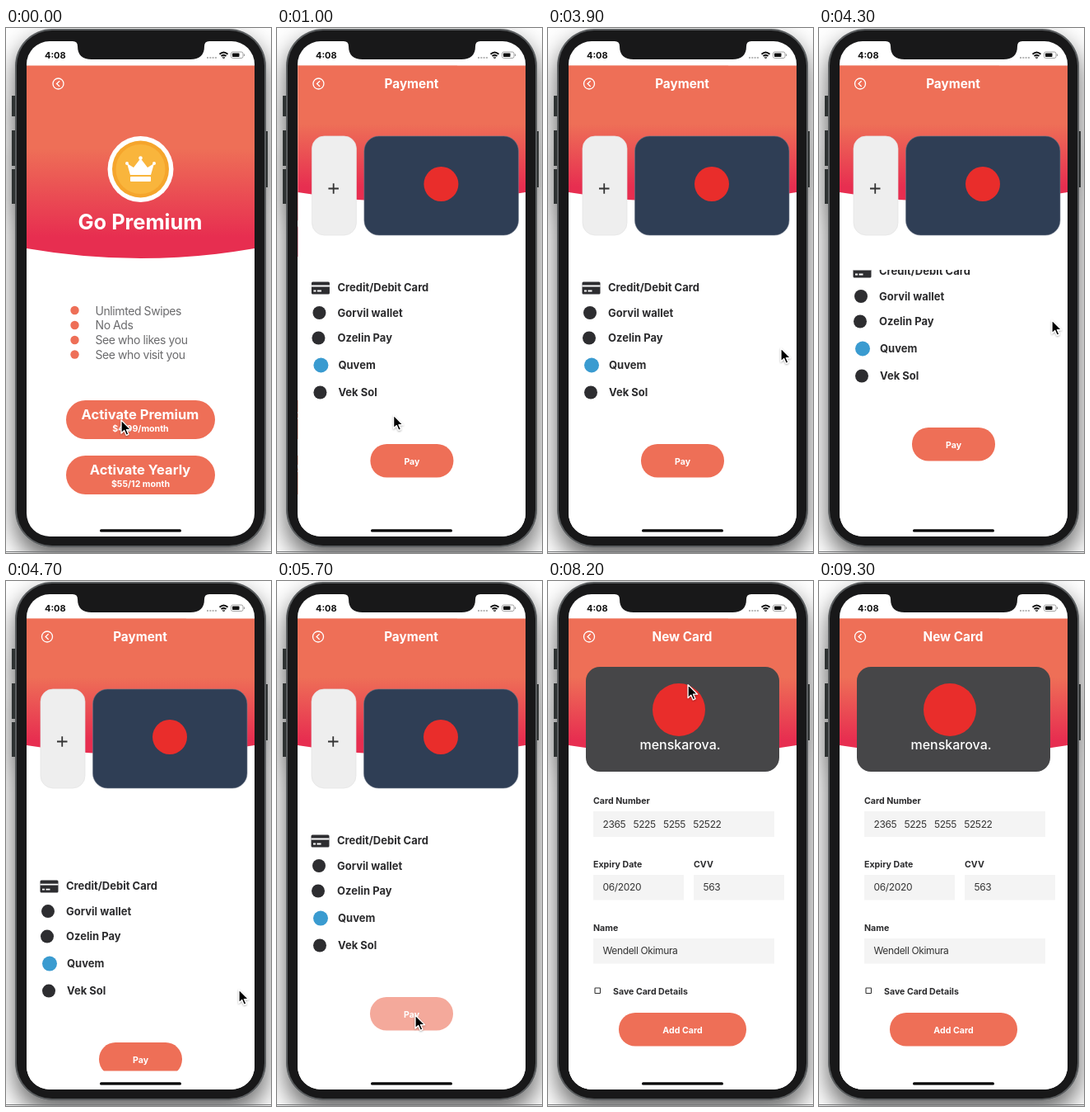
Recreate the animation shown at these times as an HTML page. Size 322x636 px, loop 9.4 s.

```html
<!DOCTYPE html>
<html lang="en">
<head>
<meta charset="utf-8">
<title>Premium checkout</title>
<style>
  html, body { margin: 0; width: 100%; height: 100%; overflow: hidden; background: #fff; }
  svg { display: block; width: 322px; height: 636px; }
  text { font-family: Inter, "Open Sans", sans-serif; fill: #2b2b2d; }
  .mid { text-anchor: middle; }
  .white, .white text { fill: #fff; font-weight: 700; }
  .title { font-size: 15.3px; }
  .h1 { font-size: 25.4px; }
  .big { font-size: 16.5px; }
  .small { font-size: 10.6px; }
  .perks text { font-size: 14px; letter-spacing: -.03em; fill: #6b6b6d; }
  .perks circle, .btn { fill: #ee6f57; }
  .methods text { font-size: 13px; font-weight: 700; }
  .label { font-size: 10.6px; font-weight: 700; }
  .field { fill: #f4f4f4; }
  .value { font-size: 12px; letter-spacing: -.03em; fill: #333; white-space: pre; }
  .dark { fill: #2d2d30; }
</style>
</head>
<body>
<svg viewBox="0 0 322 636">
  <defs>
    <linearGradient id="sunset" x2="0" y2="1">
      <stop offset=".43" stop-color="#ee6f57"/>
      <stop offset=".89" stop-color="#e72e50"/>
    </linearGradient>
    <filter id="shadow" x="-25%" width="150%" y="-12%" height="125%">
      <feDropShadow dx="0" dy="14" stdDeviation="15" flood-opacity=".62"/>
    </filter>
    <filter id="pointerShadow" x="-50%" width="200%" y="-50%" height="200%">
      <feDropShadow dx="0" dy="1" stdDeviation=".8" flood-opacity=".35"/>
    </filter>
    <clipPath id="screen"><rect x="25" y="16" width="277" height="600" rx="28"/></clipPath>
    <clipPath id="listView"><rect x="25" y="293" width="277" height="300.5"/></clipPath>
    <g id="back" fill="none" stroke="#fff" stroke-width="1.3" stroke-linecap="round">
      <circle r="6.5"/>
      <path d="M1.3-3L-1.9 0 1.3 3"/>
    </g>
    <g id="shortHeader">
      <rect x="25" y="45.5" width="277" height="571" fill="#fff"/>
      <path fill="url(#sunset)" d="M25 45.5H302V199Q163.5 222 25 199Z"/>
      <use href="#back" x="50" y="67.5"/>
    </g>
  </defs>

  <g filter="url(#shadow)">
    <path fill="#2f3132" d="M7 82h6v25h-6zM7 124h6v43h-6zM7 171h6v42h-6zM313 125h5v68h-5z"/>
    <rect x="11" y="1" width="305" height="628" rx="45" fill="#5a5d5f"/>
  </g>
  <rect x="13" y="3" width="301" height="624" rx="43" fill="#181819"/>
  <rect y="634" width="322" height="1" fill="#77797b"/>

  <g clip-path="url(#screen)">
    <rect x="25" y="16" width="277" height="600" fill="#fff"/>

    <g id="premium">
      <path fill="url(#sunset)" d="M25 45.5H302V267Q163.5 291 25 267Z"/>
      <use href="#back" x="63.5" y="67.5"/>
      <circle cx="163.5" cy="171" r="40" fill="#fff"/>
      <circle cx="163.5" cy="171" r="34.5" fill="#f5a52c"/>
      <circle cx="163.5" cy="171" r="30" fill="#f9b53c"/>
      <g fill="#fff">
        <path d="M147 164l8 5 8.5-11 8.5 11 8-5-4 14h-25z"/>
        <rect x="151" y="180" width="25" height="6" rx="1"/>
        <circle cx="147" cy="164" r="2"/>
        <circle cx="163.5" cy="157.5" r="2.3"/>
        <circle cx="180" cy="164" r="2"/>
      </g>
      <text class="mid white h1" x="163" y="243.5">Go Premium</text>
      <g class="perks">
        <circle cx="83.5" cy="342" r="5.2"/><text x="108.5" y="347.5">Unlimted Swipes</text>
        <circle cx="83.5" cy="360" r="5.2"/><text x="108.5" y="365.3">No Ads</text>
        <circle cx="83.5" cy="378" r="5.2"/><text x="108.5" y="383">See who likes you</text>
        <circle cx="83.5" cy="395.5" r="5.2"/><text x="108.5" y="400.8">See who visit you</text>
      </g>
      <g id="activate" class="mid white">
        <rect class="btn" x="73" y="451" width="181" height="47" rx="23.5"/>
        <text class="big" x="163" y="474">Activate Premium</text>
        <text class="small" x="163.5" y="489">$4.99/month</text>
      </g>
      <g class="mid white">
        <rect class="btn" x="73" y="518" width="181" height="47" rx="23.5"/>
        <text class="big" x="163" y="541">Activate Yearly</text>
        <text class="small" x="163.5" y="556">$55/12 month</text>
      </g>
    </g>

    <g id="payment">
      <use href="#shortHeader"/>
      <text class="mid white title" x="163" y="72.7">Payment</text>
      <g id="plus">
        <rect x="42" y="131" width="54" height="120" rx="15" fill="#eee" stroke="#e2e2e2" stroke-width=".7"/>
        <path d="M62 194.5h12.500M68.250 188.250v12.500" stroke="#333" stroke-width="1.8"/>
      </g>
      <rect x="105.5" y="131" width="187.5" height="120" rx="18" fill="#2f3e55" stroke="#6c7686" stroke-width=".6"/>
      <circle cx="199" cy="189" r="21" fill="#e92d2b"/>
      <g clip-path="url(#listView)">
        <g id="list">
          <g class="methods">
            <rect class="dark" x="41.5" y="307.5" width="22" height="15" rx="1.5"/>
            <path d="M41.500 312.500h22M44 318.500h3M48.500 318.500h5" stroke="#fff" stroke-width="1.8"/>
            <circle class="dark" cx="51" cy="345" r="8"/>
            <circle class="dark" cx="50" cy="375.5" r="8"/>
            <circle cx="53" cy="408.5" r="9" fill="#3a9bd0"/>
            <circle class="dark" cx="52" cy="441.5" r="8"/>
            <text x="73" y="319">Credit/Debit Card</text>
            <text x="73" y="349.5">Gorvil wallet</text>
            <text x="73" y="380">Ozelin Pay</text>
            <text x="74" y="413">Quvem</text>
            <text x="74" y="446">Vek Sol</text>
          </g>
          <g id="pay" class="mid white">
            <rect class="btn" x="113" y="504" width="101" height="40.5" rx="20"/>
            <text class="small" x="163.5" y="529">Pay</text>
          </g>
        </g>
      </g>
    </g>

    <g id="newCard">
      <use href="#shortHeader"/>
      <text class="mid white title" x="163" y="72.7">New Card</text>
      <rect x="46" y="104" width="235" height="127" rx="17" fill="#464648"/>
      <circle cx="159" cy="156" r="32" fill="#e92d2b"/>
      <text x="160.5" y="204" class="mid" style="font-size:16px;font-weight:500;fill:#fff">menskarova.</text>
      <text class="label" x="55" y="270">Card Number</text>
      <rect class="field" x="55" y="279" width="220" height="31"/>
      <text class="value" x="66.5" y="298.5">2365   5225   5255   52522</text>
      <text class="label" x="55" y="347">Expiry Date</text>
      <rect class="field" x="55" y="356" width="110" height="30.5"/>
      <text class="value" x="66.5" y="375">06/2020</text>
      <text class="label" x="177" y="347">CVV</text>
      <rect class="field" x="177" y="356" width="110" height="30.5"/>
      <text class="value" x="188.5" y="375">563</text>
      <text class="label" x="55" y="424">Name</text>
      <rect class="field" x="55" y="433" width="220" height="30.5"/>
      <text class="value" x="66.5" y="452">Wendell Okimura</text>
      <rect x="57" y="493" width="6.5" height="6.5" rx=".8" fill="none" stroke="#333" stroke-width="1.1"/>
      <text class="label" x="79" y="500.5">Save Card Details</text>
      <rect class="btn" x="86" y="523" width="155" height="40.5" rx="20"/>
      <text class="mid white small" x="163.5" y="548">Add Card</text>
    </g>

    <path fill="#181819" d="M81 15v1q6 0 6 6q0 16 17 16h120q17 0 17-16q0-6 6-6v-1z"/>
    <text x="47" y="37" style="font-size:11px;font-weight:700;fill:#111">4:08</text>
    <path d="M244 36h12" stroke="#b5b5b5" stroke-width="1.8" stroke-dasharray="2 1.3"/>
    <g fill="none" stroke="#111" stroke-width="1.9">
      <path d="M259.500 31.800q5-4.600 10 0M261.500 34q3-2.600 6 0"/>
      <circle cx="264.5" cy="35.8" r=".4"/>
    </g>
    <rect x="273.5" y="29" width="14.5" height="7.5" rx="2" fill="none" stroke="#999" stroke-width=".9"/>
    <rect x="275" y="30.5" width="8.5" height="4.5" rx=".8" fill="#111"/>
    <path d="M289.500 31.500v2.500" stroke="#999"/>
    <rect x="114" y="607.3" width="99" height="3.2" rx="1.6" fill="#000"/>
  </g>

  <path id="cursor" d="M0 0V16l3.700-3.500 2.500 5.800 2.700-1.200-2.500-5.500h5.100z"
        stroke="#fff" stroke-width="1.3" stroke-linejoin="round" filter="url(#pointerShadow)"/>
</svg>

<script>
const LOOP = 9400, WIDTH = 277;
const DRAG = { start: 4000, end: 4850, y: 388 };
const pointerPath = [ // time, x, y
  [0, 140, 475], [900, 140, 475], [1900, 197.5, 268], [2900, 197.5, 268],
  [3700, 283, 388], [4000, 283, 388], [4300, 283, 354], [4700, 283, 495],
  [4950, 283, 495], [5550, 168, 526], [6200, 168, 526], [7000, 164, 258],
  [7400, 68, 200], [7900, 68, 200], [8600, 326, 12]
];

const el = id => document.getElementById(id);
const clamp = v => Math.min(1, Math.max(0, v));
const smooth = v => (v = clamp(v), v * v * (3 - 2 * v));
const slide = (t, start) => 1 - (1 - clamp((t - start) / 500)) ** 4;
const press = (t, down, up) =>
  1 - .8 * smooth((t - down) / 150) * (1 - smooth((t - up) / 250));
const move = (id, x, y = 0) => el(id).setAttribute('transform', `translate(${x} ${y})`);
const fade = (id, opacity) => el(id).setAttribute('opacity', opacity);

function pointer(t) {
  const next = pointerPath.findIndex(p => p[0] > t);
  if (next < 0) return pointerPath.at(-1).slice(1);
  const [t0, x0, y0] = pointerPath[next - 1], [t1, x1, y1] = pointerPath[next];
  const k = smooth((t - t0) / (t1 - t0));
  return [x0 + (x1 - x0) * k, y0 + (y1 - y0) * k];
}

// The list follows the drag with resistance, then settles back.
function listOffset(t) {
  if (t < DRAG.start) return 0;
  const pull = .63 * (pointer(Math.min(t, DRAG.end))[1] - DRAG.y);
  const offset = pull / (1 + Math.abs(pull) / 300);
  return offset * Math.exp(-Math.max(0, t - DRAG.end) / 110);
}

function draw(now) {
  const t = now % LOOP;
  const toPayment = slide(t, 600), toCard = slide(t, 7700);
  move('premium', -.3 * WIDTH * toPayment);
  move('payment', WIDTH * (1 - toPayment) - .3 * WIDTH * toCard);
  move('newCard', WIDTH * (1 - toCard));
  move('list', 0, listOffset(t));
  fade('activate', press(t, 300, 550));
  fade('pay', press(t, 5625, 5875));
  fade('plus', press(t, 7480, 7650));
  move('cursor', ...pointer(t));
  fade('cursor', t < 8600 ? 1 : 0);
  requestAnimationFrame(draw);
}
requestAnimationFrame(draw);
</script>
</body>
</html>
```
